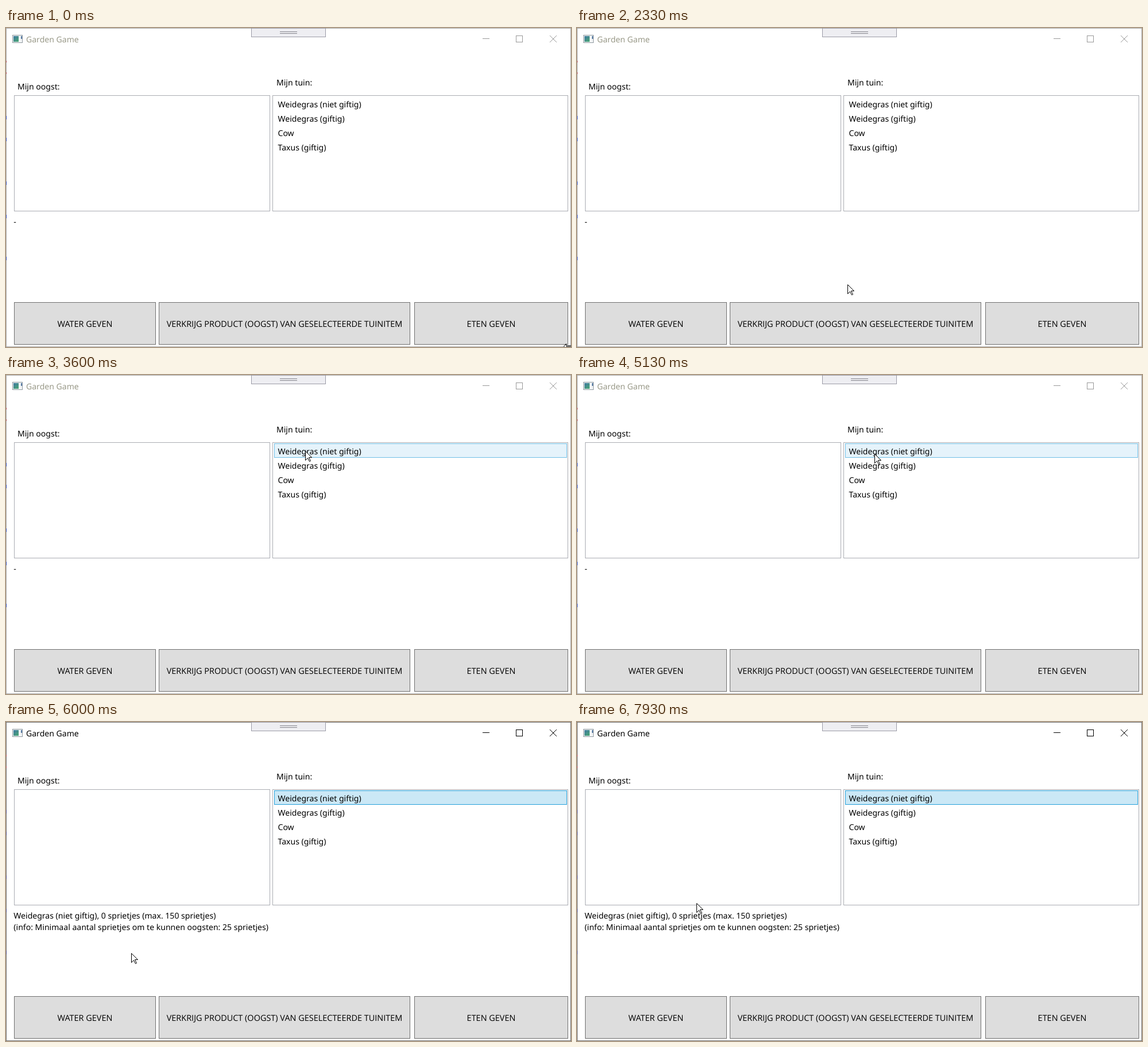
An HTML page with a canvas for the animation above (8 s loop, 984 by 555 pixels).

```html
<!DOCTYPE html>
<html lang="nl">
<head>
<meta charset="utf-8">
<title>Garden Game</title>
<style>
  html, body { margin: 0; width: 100%; height: 100%; overflow: hidden; background: #fff; }
  canvas { display: block; }
</style>
</head>
<body>
<canvas id="stage" width="984" height="555"></canvas>
<script>
const ctx = document.getElementById('stage').getContext('2d');
const LOOP = 8000, TICK = 1000 / 15, ACTIVATED = 5330;
const BODY = '14.05px "Noto Sans", sans-serif';
const CAPS = '14.46px "Open Sans", sans-serif';

const items = ['Weidegras (niet giftig)', 'Weidegras (giftig)', 'Cow', 'Taxus (giftig)'];
const buttons = [
  [14, 247, 'WATER GEVEN'],
  [266, 438, 'VERKRIJG PRODUCT (OOGST) VAN GESELECTEERDE TUINITEM'],
  [711, 268, 'ETEN GEVEN']
];

// Each move eases the pointer to (x, y); bow bends the way there
const entry = { x: 568, y: 547 };
const moves = [
  { from: 2070, to: 2330, x: 471, y: 446 },
  { from: 2330, to: 2400, x: 467, y: 446 },
  { from: 2600, to: 3000, x: 522, y: 107 },
  { from: 3070, to: 3470, x: 522, y: 127 },
  { from: 3470, to: 3600, x: 521, y: 132 },
  { from: 4470, to: 5130, x: 518, y: 137 },
  { from: 5670, to: 6000, x: 218, y: 402 },
  { from: 6200, to: 7070, x: 176, y: 323 },
  { from: 7070, to: 7930, x: 208, y: 315, bow: 39 }
];

const smooth = k => k * k * (3 - 2 * k);

function pointerAt(t) {
  if (t < moves[0].from) return null;
  let { x, y } = entry;
  for (const m of moves) {
    const k = Math.min(1, Math.max(0, (t - m.from) / (m.to - m.from)));
    const e = smooth(k), bend = (m.bow || 0) * Math.sin(Math.PI * e);
    x += (m.x - x) * e - bend;
    y += (m.y - y) * e + bend;
  }
  return { x: Math.round(x), y: Math.round(y) };
}

function inside(p, x, y, w, h) {
  return p && p.x >= x && p.x < x + w && p.y >= y && p.y < y + h;
}

function rect(x, y, w, h, color) {
  ctx.fillStyle = color;
  ctx.fillRect(x, y, w, h);
}

function box(x, y, w, h, fill, border) {
  rect(x, y, w, h, border);
  rect(x + 1, y + 1, w - 2, h - 2, fill);
}

function text(str, x, y, color = '#000', font = BODY, align = 'left') {
  ctx.font = font;
  ctx.textAlign = align;
  ctx.fillStyle = color;
  ctx.fillText(str, x, y);
}

function shape(points, x, y, angle = 0) {
  ctx.save();
  ctx.translate(x + 0.5, y + 0.5);
  ctx.rotate(angle);
  ctx.beginPath();
  points.forEach(p => ctx.lineTo(...p));
  ctx.closePath();
  ctx.fillStyle = '#fff';
  ctx.strokeStyle = '#000';
  ctx.lineWidth = 1;
  ctx.fill();
  ctx.stroke();
  ctx.restore();
}

const ARROW = [[0, 0], [0, 16], [4, 12], [7, 18], [9, 17], [6, 11], [11, 11]];
const half = [[-11, 0], [-7, -4], [-7, -1], [7, -1], [7, -4]];
const RESIZE = half.concat(half.map(([x, y]) => [-x, -y]));

function drawCursor(t, p) {
  if (t < 330) shape(RESIZE, 982 + Math.floor(t / 65), 553);
  else if (t >= 800 && t < 870) shape(RESIZE, 972, 554, Math.PI / 4);
  else if (p && t < 2130) shape(RESIZE, p.x, p.y + 11, Math.PI / 2);
  else if (p) shape(ARROW, p.x, p.y);
}

function drawIcon() {
  box(11, 12, 18, 14, '#f4f6f7', '#8f999f');
  const g = ctx.createLinearGradient(13, 14, 20, 23);
  g.addColorStop(0, '#4179a3');
  g.addColorStop(1, '#48a078');
  rect(13, 14, 9, 10, g);
  rect(26, 14, 2, 5, '#587ca6');
}

function drawFrame(active) {
  const ink = active ? '#000' : '#999';
  box(0, 0, 984, 555, '#fff', active ? '#707070' : '#a8a8a8');

  // Slivers of the window behind, along the left edge
  for (const y of [156, 194, 270, 328, 401]) rect(0, y - 3, 1, 6, active ? '#50508c' : '#304fba');
  for (const y of [58, 78]) rect(0, y - 1, 1, 3, '#b04a55');

  drawIcon();
  text('Garden Game', 35, 25, active ? '#000' : '#999988');

  box(427, 0, 130, 16, '#eeeef2', '#9b9ba6');
  for (const y of [6, 9]) rect(477, y, 30, 1, '#85858c');

  rect(830, 18, 12, 1, ink);
  box(888, 13, 12, 12, '#fff', ink);
  ctx.strokeStyle = ink;
  ctx.lineWidth = 1;
  ctx.beginPath();
  ctx.moveTo(947, 13);
  ctx.lineTo(959, 25);
  ctx.moveTo(959, 13);
  ctx.lineTo(947, 25);
  ctx.stroke();
}

function drawLists(p, active) {
  text('Mijn oogst:', 20, 107);
  text('Mijn tuin:', 471, 100);
  box(14, 117, 446, 202, '#fff', '#abadb3');
  box(464, 117, 515, 202, '#fff', '#abadb3');
  items.forEach((name, i) => {
    const y = 119 + 25 * i;
    if (active && i === 0) box(467, y, 510, 25, '#cbe8f6', '#26a0da');
    else if (inside(p, 467, y, 510, 25)) box(467, y, 510, 25, '#e5f3fb', '#70c0e7');
    text(name, 473.5, y + 19);
  });
}

function drawInfo(active) {
  const lines = active
    ? ['Weidegras (niet giftig), 0 sprietjes (max. 150 sprietjes)',
       '(info: Minimaal aantal sprietjes om te kunnen oogsten: 25 sprietjes)']
    : ['-'];
  lines.forEach((line, i) => text(line, 13.3, 342 + 20 * i));
}

function drawButtons(p) {
  for (const [x, w, label] of buttons) {
    const hover = inside(p, x, 477, w, 70);
    box(x, 477, w, 74, hover ? '#bee6fd' : '#ddd', hover ? '#3c7fb1' : '#707070');
    text(label, x + w / 2, 520, '#000', CAPS, 'center');
  }
}

function draw(now) {
  // The screen refreshes 15 times a second, on 10 ms marks
  const tick = Math.floor(((now % LOOP) + 4) / TICK);
  const t = (Math.round(tick * TICK / 10) * 10) % LOOP;
  const active = t >= ACTIVATED;
  const p = pointerAt(t);
  ctx.textRendering = 'geometricPrecision';
  drawFrame(active);
  drawLists(p, active);
  drawInfo(active);
  drawButtons(p);
  drawCursor(t, p);
}

const start = performance.now();
function loop() {
  draw(performance.now() - start);
  requestAnimationFrame(loop);
}
loop();
</script>
</body>
</html>
```
